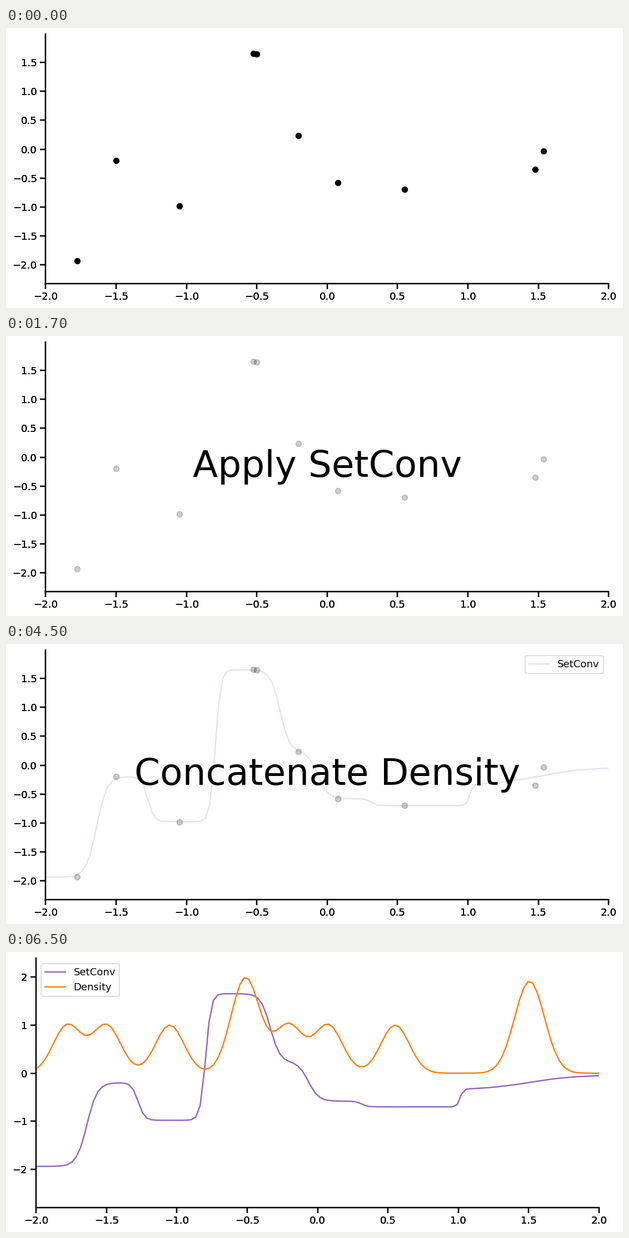
These frames come from a looping animation (1110 px wide and 505 px high, 8000 ms). A matplotlib script:

```python
import numpy as np
import matplotlib.pyplot as plt
from matplotlib.animation import FuncAnimation

WIDTH, HEIGHT, DPI = 1110, 505, 100
PX = 72 / DPI  # points per pixel
EM = 18.2 * PX

plt.rcParams.update({
    "font.family": "DejaVu Sans",
    "font.size": EM,
    "xtick.labelsize": EM,
    "ytick.labelsize": EM,
    "legend.fontsize": EM,
    "axes.linewidth": 2.2 * PX,
    "axes.spines.top": False,
    "axes.spines.right": False,
    "xtick.major.width": 2.2 * PX,
    "ytick.major.width": 2.2 * PX,
    "xtick.major.size": 9.9 * PX,
    "ytick.major.size": 9.9 * PX,
    "xtick.major.pad": 5.8 * PX,
    "ytick.major.pad": 5.8 * PX,
    "lines.linewidth": 2.5 * PX,
    "lines.solid_capstyle": "round",
    "patch.linewidth": 1.6 * PX,
})

PURPLE, ORANGE = "tab:purple", "tab:orange"
FADED = 0.2
LENGTH_SCALE = 0.101

points_x = np.array([-1.777, -1.5, -1.05, -0.525, -0.499,
                     -0.206, 0.076, 0.551, 1.476, 1.537])
points_y = np.array([-1.936, -0.197, -0.978, 1.656, 1.645,
                     0.236, -0.58, -0.699, -0.345, -0.037])

grid = np.linspace(-2, 2, 128)
weights = np.exp(-0.5 * ((grid[:, None] - points_x) / LENGTH_SCALE) ** 2)
density = weights.sum(axis=1)
set_conv = weights @ points_y / density
Y_LIMITS = 1.2 * np.array([points_y.min(), points_y.max()])

fig = plt.figure(figsize=(WIDTH / DPI, HEIGHT / DPI), dpi=DPI, facecolor="white")


def make_axes(left=71.4, zoom=1.0):
    """Stack identical axes so ticks and labels look heavier; return the top one."""
    fig.clear()
    top, bottom, width = 11.5, 460.7, 1012.8
    box = [left / WIDTH, 1 - bottom / HEIGHT, width / WIDTH, (bottom - top) / HEIGHT]
    for _ in range(3):
        ax = fig.add_axes(box)
        ax.patch.set_visible(False)
        ax.set_xlim(-2, 2)
        ax.set_ylim(zoom * Y_LIMITS)
    return ax


def draw_points(ax, alpha=1, edge=1.4):
    ax.plot(points_x, points_y, "o", color="black", alpha=alpha,
            markersize=10 * PX, markeredgewidth=edge * PX)


def draw_set_conv(ax, alpha=1):
    ax.plot(grid, set_conv, color=PURPLE, alpha=alpha, label="SetConv")


def draw_title(ax, text):
    ax.text(0.5, 0.5, text, transform=ax.transAxes, fontsize=66.1 * PX,
            ha="center", va="center")


def show_points():
    draw_points(make_axes())


def announce_set_conv():
    ax = make_axes()
    draw_points(ax, FADED)
    draw_title(ax, "Apply SetConv")


def show_set_conv():
    ax = make_axes()
    draw_points(ax, edge=1.8)
    draw_set_conv(ax)
    ax.legend(loc="upper right")


def announce_density():
    ax = make_axes()
    draw_points(ax, FADED, edge=1.8)
    draw_set_conv(ax, FADED)
    ax.legend(loc="upper right")
    draw_title(ax, "Concatenate Density")


def show_density():
    ax = make_axes(left=54.1, zoom=1.2)
    draw_set_conv(ax)
    ax.plot(grid, density, color=ORANGE, label="Density")
    ax.legend(loc="upper left")


# Each scene with its length in half-second steps
SCENES = [(show_points, 1), (announce_set_conv, 4), (show_set_conv, 4),
          (announce_density, 4), (show_density, 3)]
TIMELINE = [scene for scene, steps in SCENES for _ in range(steps)]


def update(frame):
    TIMELINE[frame]()
    return []


animation = FuncAnimation(fig, update, frames=len(TIMELINE), interval=500,
                          init_func=lambda: [], repeat=True, repeat_delay=0)
plt.show()
```
